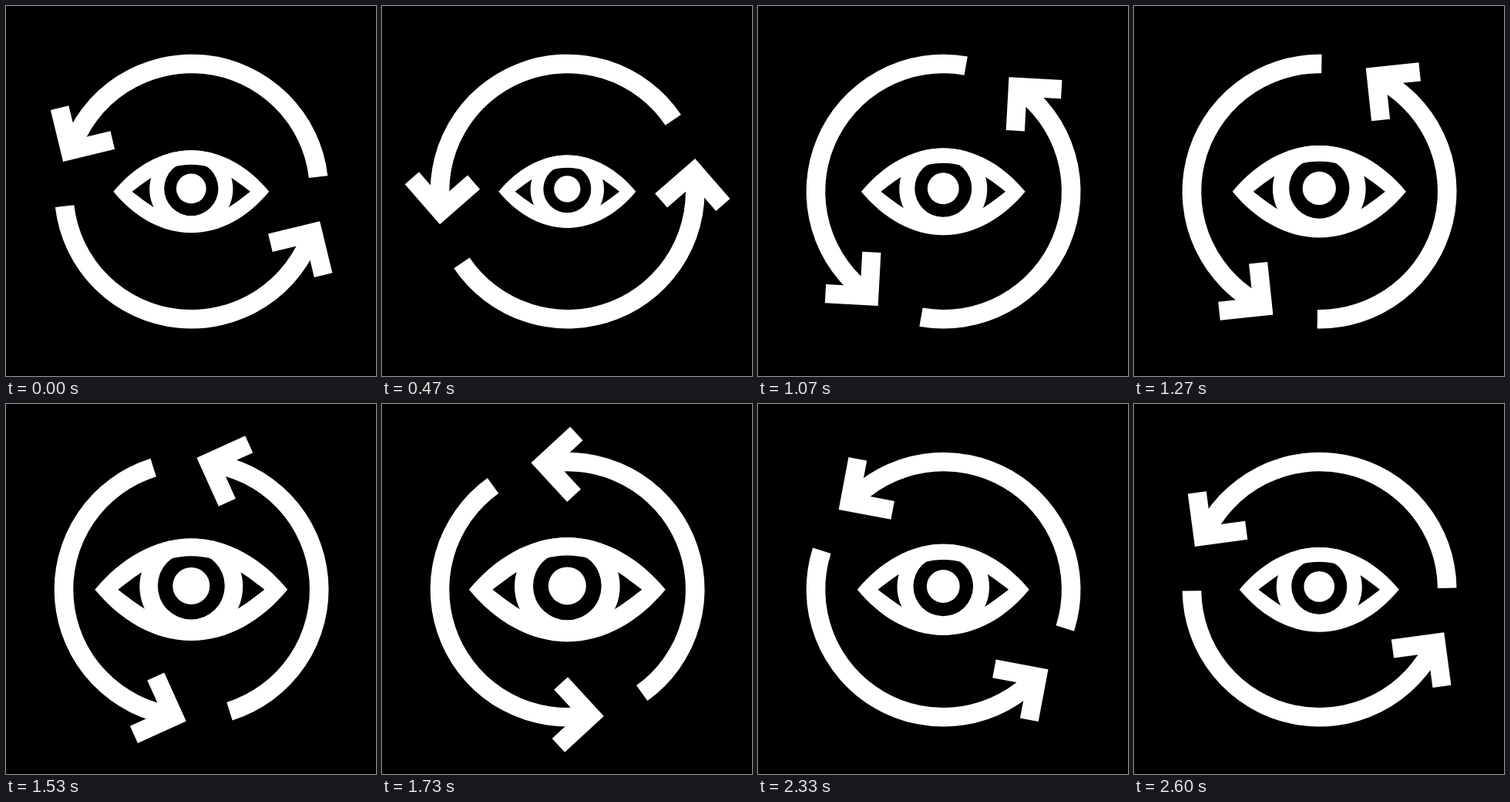
Recreate the animation shown at these times as an HTML page. Size 480 px wide and 480 px high, loop 2.67 s.

```html
<!DOCTYPE html>
<html lang="en">
<head>
<meta charset="utf-8">
<title>Eye with turning arrows</title>
<style>
  html, body { margin: 0; width: 100%; height: 100%; overflow: hidden; background: #000; }
  svg { display: block; width: 100%; height: 100%; }
</style>
</head>
<body>
<svg viewBox="0 0 480 480">
  <defs>
    <path id="outer" d="M-125 0C-92 -40 -48 -66.3 0 -66.3S92 -40 125 0C92 40 48 66.3 0 66.3S-92 40 -125 0Z"/>
    <path id="inner" d="M-95 0C-64 -24 -38 -43.5 0 -43.5S64 -24 95 0C64 24 38 43.5 0 43.5S-64 24 -95 0Z"/>
    <clipPath id="lids"><use href="#outer"/></clipPath>
    <clipPath id="opening"><use href="#inner"/></clipPath>
    <g id="arrow">
      <path d="M165.6 0A165.6 165.6 0 0 0 -150.1 -70" fill="none" stroke="#fff" stroke-width="24.6"/>
      <path d="M0 0V-69H24.2V-24.2H69V0Z" transform="translate(-161 -57.5) rotate(-7)" fill="#fff"/>
    </g>
  </defs>
  <g id="ring">
    <use href="#arrow"/>
    <use href="#arrow" transform="rotate(180)"/>
  </g>
  <g id="eye">
    <use href="#outer" fill="#fff"/>
    <use href="#inner"/>
    <circle cy="-4" r="67" fill="#fff" clip-path="url(#lids)"/>
    <g clip-path="url(#opening)"><circle cy="-4.8" r="43.5"/></g>
    <circle cy="-4.8" r="24" fill="#fff"/>
  </g>
</svg>
<script>
const LOOP = 2670, FRAME = 200 / 3, LAST = 39;
const START = 6.6, STEP = 4.58;
const SMALL = { at: 0.2207, width: 167.3 };
const BIG = { at: 0.612, width: 262.7 };

const ring = document.getElementById('ring');
const eye = document.getElementById('eye');
const mix = (a, b, u) => a + (b - a) * u;

// The motion lags a little, then skips ahead, once every 16 ticks.
function steps(tick) {
  const n = tick + 8, s = n % 16;
  const local = s <= 8 ? s : s <= 11 ? 8 + (s - 8) * 2 / 3 : s - 1;
  return n - s + local - 8;
}

// Eye width: a fast linear rise and a slower linear fall.
function eyeWidth(p) {
  const rise = BIG.at - SMALL.at;
  const u = (p - SMALL.at + 1) % 1;
  return u < rise
    ? mix(SMALL.width, BIG.width, u / rise)
    : mix(BIG.width, SMALL.width, (u - rise) / (1 - rise));
}

function draw(now) {
  const tick = Math.min(LAST, Math.floor((now % LOOP + 5) / FRAME));
  const turn = steps(tick) * STEP;
  ring.setAttribute('transform', `translate(240.6 240.6) rotate(${-START - turn})`);
  eye.setAttribute('transform', `translate(240.3 240.8) scale(${eyeWidth(turn / 180) / 250})`);
}

let begin;
function loop(now) {
  begin ??= now;
  draw(now - begin);
  requestAnimationFrame(loop);
}
draw(0);
requestAnimationFrame(loop);
</script>
</body>
</html>
```
